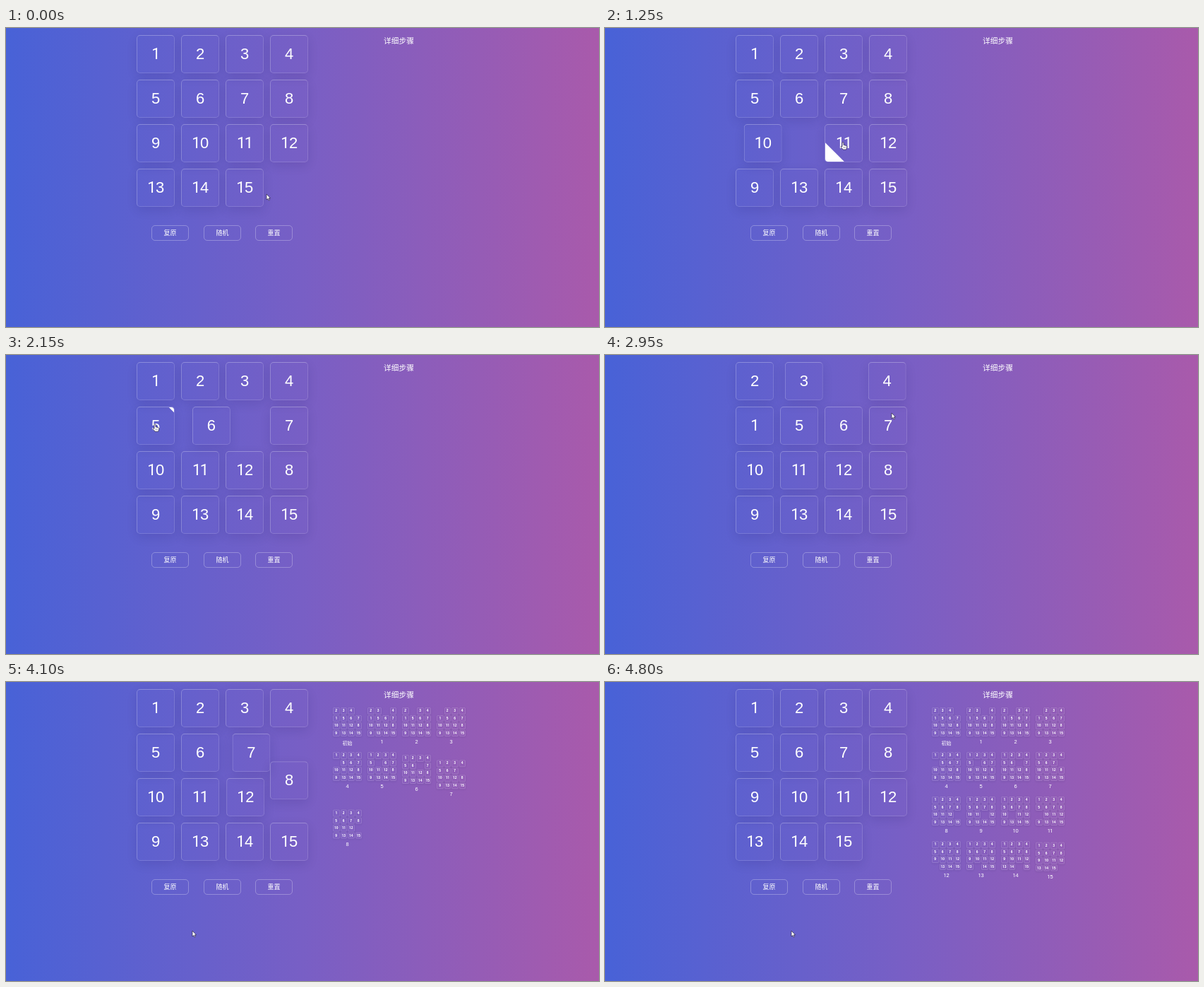
Write an HTML page that moves like this. It is 840 px wide and 423 px high and loops after 4850 ms.

```html
<!DOCTYPE html>
<html lang="zh-CN">
<head>
<meta charset="utf-8">
<title>数字华容道</title>
<style>
  html, body { margin: 0; width: 100%; height: 100%; overflow: hidden; }
  body {
    position: relative;
    color: #fff;
    background: linear-gradient(90deg, #4862d7, #785fc5 50%, #a95aab);
    font-family: "Liberation Sans", "Noto Sans CJK SC", "Noto Sans CJK", sans-serif;
    -webkit-text-size-adjust: none;
  }
  .tile, .btn, .cell, .label, .title, .step, .cursor { position: absolute; box-sizing: border-box; }
  .tile, .btn, .cell, .label, .title {
    display: flex; align-items: center; justify-content: center;
    line-height: 1; white-space: nowrap;
  }
  /* a figure one without a foot */
  b {
    position: relative; left: .02em;
    font-family: Roboto, sans-serif; font-weight: inherit; line-height: 0;
  }
  b + b { margin-left: -.074em; }
  .tile, .btn {
    border: 1px solid rgba(255, 255, 255, .15);
    border-top-color: rgba(255, 255, 255, .27);
    border-left-color: rgba(255, 255, 255, .23);
    border-radius: 5px;
  }
  .tile {
    left: 185px; top: 10px; width: 54px; height: 54px;
    font-size: 22px; overflow: hidden;
    box-shadow: 0 5px 15px rgba(20, 10, 70, .11);
  }
  .tile i {
    position: absolute; left: 0; top: -1px; width: 27px; height: 54px;
    background: #fff; visibility: hidden;
  }
  .btn {
    top: 279px; width: 53px; height: 22px; font-size: 9px;
    border-color: rgba(255, 255, 255, .27);
  }
  .btn.focus { border-color: rgba(255, 255, 255, .6); box-shadow: 0 0 0 1px rgba(255, 255, 255, .3); }
  .title { left: 506px; top: 8px; width: 101px; height: 20px; font-size: 10.7px; }
  .step { width: 41px; height: 56px; opacity: 0; }
  .cell {
    width: 9.5px; height: 9.5px; font-size: 5px; font-weight: bold;
    border: 1px solid rgba(255, 255, 255, .14); border-radius: 1.5px;
    box-shadow: 0 1px 3px rgba(20, 10, 70, .1);
  }
  .label { left: 0; top: 44px; width: 41px; height: 10px; font-size: 7.5px; }
  .label.first { top: 45px; font-size: 7px; }
  .cursor { left: 0; top: 0; width: 12px; height: 14px; overflow: visible; }
</style>
</head>
<body>
<div class="title">详细步骤</div>
<div class="btn" id="solve" style="left:206px">复原</div>
<div class="btn" style="left:280px">随机</div>
<div class="btn" style="left:353px">重置</div>
<script>
  const LOOP = 4850, PITCH = 63, SLIDE = 225, SHEEN = 150;
  // [tile, slide start in ms, how long before it the pointer enters]
  const clicks = [
    [15, 200], [14, 415], [13, 640], [9, 870], [10, 1088],
    [11, 1312], [12, 1500], [8, 1690], [7, 1880], [6, 2077],
    [5, 2195, 170], [1, 2400], [2, 2590], [3, 2772], [4, 2932, 150]
  ];

  const clamp = v => Math.max(0, Math.min(1, v));
  const smooth = v => { v = clamp(v); return v * v * (3 - 2 * v); };
  const add = (cls, parent = document.body, text = '') => {
    const el = document.createElement('div');
    el.className = cls;
    if (text) el.innerHTML = `<span>${String(text).replace(/1/g, '<b>1</b>')}</span>`;
    parent.appendChild(el);
    return el;
  };

  const tiles = [];
  for (let n = 1; n <= 15; n++) {
    const el = add('tile', document.body, n);
    const sheen = el.appendChild(document.createElement('i'));
    tiles[n] = { el, sheen, home: n - 1, moves: [], hover: 0 };
  }

  // The board lists the tile in each cell; 0 is the gap.
  const board = [1, 2, 3, 4, 5, 6, 7, 8, 9, 10, 11, 12, 13, 14, 15, 0];
  function slide(n, start) {
    const from = board.indexOf(n), to = board.indexOf(0);
    board[to] = n;
    board[from] = 0;
    tiles[n].moves.push({ start, dx: to % 4 - from % 4, dy: (to >> 2) - (from >> 2) });
    return from;
  }

  const steps = [];
  function snapshot(k) {
    const el = add('step');
    el.style.left = 463 + k % 4 * 49 + 'px';
    el.style.top = 36 + (k >> 2) * PITCH + 'px';
    board.forEach((n, i) => {
      if (!n) return;
      const cell = add('cell', el, n);
      cell.style.left = i % 4 * 10.5 + 'px';
      cell.style.top = (i >> 2) * 10.5 + 'px';
    });
    add(k ? 'label' : 'label first', el, k || '初始');
    steps.push({ el, start: 3430 + 75 * k });
  }

  const path = [[0, 369, 235], [60, 369, 235]];
  for (const [n, start, lead = 105] of clicks) {
    const from = slide(n, start);
    const x = 211 + from % 4 * PITCH, y = 36 + (from >> 2) * PITCH;
    tiles[n].hover = start - lead;
    path.push([start - 90, x, y], [start - 55, x, y]);
  }
  path.push([2950, 406, 82], [3300, 240, 309], [3360, 244, 291],
    [3420, 244, 291], [3545, 264, 350], [3620, 264, 352], [LOOP, 264, 352]);

  snapshot(0);
  clicks.slice().reverse().forEach(([n], i) => {
    slide(n, 3399 + 76 * (i + 1));
    snapshot(i + 1);
  });

  document.body.insertAdjacentHTML('beforeend', `
    <svg class="cursor" id="arrow" viewBox="0 0 12 14">
      <path d="M0 0V8L1.9 6.4L3.1 9L4.4 8.4L3.2 5.8H5.6Z" fill="#fff" stroke="#292342" stroke-width=".7"/>
    </svg>
    <svg class="cursor" id="hand" viewBox="0 0 12 14">
      <path d="M-1 0Q0-1 1 0V3.5L5 4.5Q6 5 5.6 7L4.7 10H0L-3 6Q-2.5 4.5-1 6Z" fill="#fff" stroke="#292342" stroke-width=".7"/>
      <path d="M1.2 6V8M3.1 6V8" stroke="#292342" stroke-width=".5"/>
    </svg>`);
  const arrow = document.getElementById('arrow');
  const hand = document.getElementById('hand');
  const solve = document.getElementById('solve');

  function pointerAt(t) {
    const i = Math.max(1, path.findIndex(p => p[0] >= t));
    const [t0, x0, y0] = path[i - 1], [t1, x1, y1] = path[i];
    const k = smooth((t - t0) / (t1 - t0));
    return [x0 + (x1 - x0) * k, y0 + (y1 - y0) * k];
  }

  function drawTile({ el, sheen, home, moves, hover }, t) {
    let x = home % 4, y = home >> 2;
    for (const m of moves) {
      const k = smooth((t - m.start) / SLIDE);
      x += m.dx * k;
      y += m.dy * k;
    }
    el.style.transform = `translate(${x * PITCH}px, ${y * PITCH}px)`;
    const k = (t - hover) / SHEEN;
    sheen.style.visibility = k > 0 && k < 1 ? 'visible' : 'hidden';
    sheen.style.transform = `translateX(${-54 + 134 * smooth(k)}px) skewX(45deg)`;
  }

  function drawStep({ el, start }, t) {
    const age = t - start;
    el.style.opacity = clamp(age / 40);
    el.style.transform = `translateY(${25.5 * (1 - clamp(age / 262))}px)`;
  }

  function drawPointer(t) {
    const [x, y] = pointerAt(t);
    const inTile = (x - 185) % PITCH < 54 && (y - 10) % PITCH < 54;
    const isHand = t < 2900 ? inTile : t > 3330 && t < 3440;
    arrow.style.visibility = isHand ? 'hidden' : 'visible';
    hand.style.visibility = isHand ? 'visible' : 'hidden';
    arrow.style.transform = hand.style.transform = `translate(${x}px, ${y}px)`;
  }

  function frame() {
    const t = performance.now() % LOOP;
    for (let n = 1; n <= 15; n++) drawTile(tiles[n], t);
    for (const s of steps) drawStep(s, t);
    solve.classList.toggle('focus', t > 3380 && t < 3700);
    drawPointer(t);
    requestAnimationFrame(frame);
  }
  frame();
</script>
</body>
</html>
```
